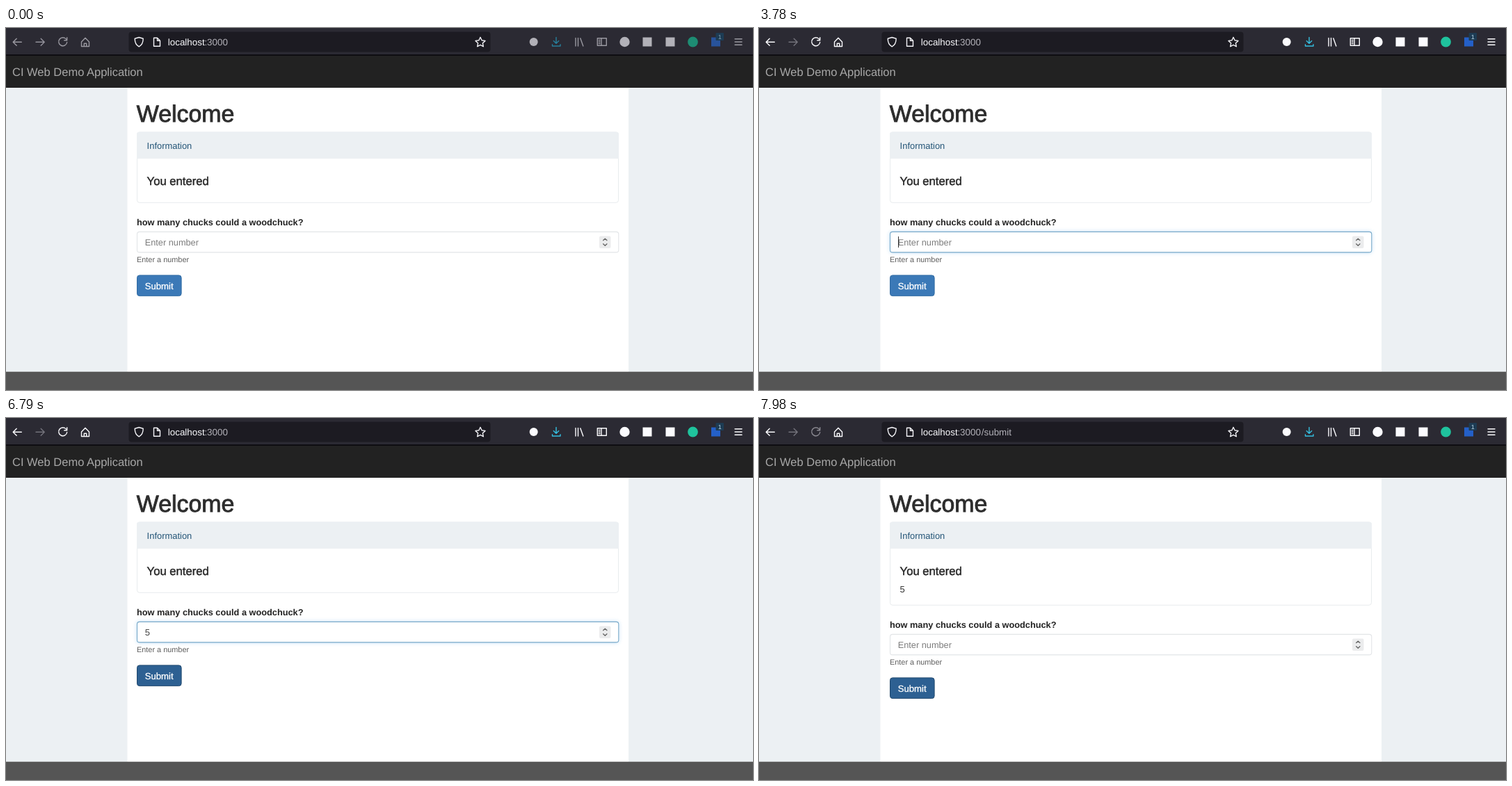
Animation, 1074 px wide and 521 px high, one loop 8000 ms. Source, as an HTML page:

```html
<!DOCTYPE html>
<html lang="en">
<head>
<meta charset="utf-8">
<title>Form demo</title>
<style>
html, body { margin: 0; width: 100%; height: 100%; overflow: hidden; background: #fff; }
svg { display: block; width: 1074px; height: 521px; }
text { font-family: "Liberation Sans", Arial, sans-serif; text-rendering: geometricPrecision; white-space: pre; }
.line { fill: none; stroke-width: 1.4; stroke-linecap: round; stroke-linejoin: round; }
#glow { filter: blur(2.5px); }
</style>
</head>
<body>
<svg viewBox="0 0 1074 521" xmlns="http://www.w3.org/2000/svg">
  <!-- page -->
  <rect width="1074" height="521" fill="#ecf0f3"/>
  <rect x="174.5" y="86" width="720.5" height="409" fill="#fff"/>
  <rect y="494.7" width="1074" height="27" fill="#555"/>
  <rect y="40" width="1074" height="46" fill="#222"/>
  <text id="brand" x="9" y="69" font-size="16.5">CI Web Demo Application</text>

  <text x="187.800" y="135" font-size="33.9" fill="#2d2d2d" stroke="#2d2d2d" stroke-width=".9">Welcome</text>
  <rect id="panel" x="188.500" y="150" width="692" height="101.300" rx="3.500" fill="#fff" stroke="#e8ecee"/>
  <path d="M188 188V153q0-3.500 3.500-3.500H877.500q3.500 0 3.500 3.500V188z" fill="#ecf0f3"/>
  <text x="202.600" y="173.600" font-size="12.95" fill="#245577">Information</text>
  <text x="202.600" y="225.600" font-size="16.65" fill="#262626" stroke="#262626" stroke-width=".45">You entered</text>
  <text id="answer" x="202.600" y="251.200" font-size="13" fill="#333">5</text>

  <g id="form">
    <text x="188" y="283.600" font-size="12.76" font-weight="700" fill="#222">how many chucks could a woodchuck?</text>
    <rect id="glow" x="187" y="292" width="695" height="32.500" rx="5" fill="#66afe9"/>
    <rect id="box" x="188.500" y="293.400" width="692.300" height="29.500" rx="3.500" fill="#fff" stroke-width="1.1"/>
    <text id="hint" x="199.700" y="312.900" font-size="12.75" fill="#7c7c7c">Enter number</text>
    <text id="digit" x="199.800" y="312.900" font-size="13" fill="#444">5</text>
    <rect id="caret" y="300" width="1" height="16" fill="#333"/>
    <rect x="853" y="299.500" width="16.500" height="17.500" rx="2" fill="#ebeced"/>
    <path class="line" d="M858.700 305.600l2.600-2.400 2.600 2.400M858.700 310.800l2.600 2.400 2.600-2.400" stroke="#666" stroke-width="1.1"/>
    <text x="188" y="337.300" font-size="10.9" fill="#5e5e5e">Enter a number</text>
    <rect id="button" x="188.500" y="355.900" width="63.600" height="29.700" rx="3.500" stroke-width="1"/>
    <text x="199.700" y="375.500" font-size="13.15" fill="#fff" stroke="#fff" stroke-width=".3">Submit</text>
  </g>

  <!-- browser toolbar -->
  <rect width="1074" height="40" fill="#2b2a33"/>
  <rect y="38" width="1074" height="2" fill="#0e0d12"/>
  <rect x="176.500" y="5.500" width="520" height="29" rx="4" fill="#1c1b22"/>
  <g class="line" stroke="#f4f4f8">
    <path d="M191.200 13.500q-4 1.300-6 1.700c0 6 2 9.500 6 11.600c4-2.100 6-5.600 6-11.600q-2-.4-6-1.700z"/>
    <path d="M212.500 14.300h5l4 4v8h-9zM217.500 14.300v4h4"/>
    <path d="M682 13.300l2.100 4.500 4.900.600-3.600 3.400.900 4.900-4.300-2.400-4.300 2.400.900-4.900-3.600-3.400 4.900-.6z"/>
  </g>
  <text y="24.800" font-size="13.4"><tspan x="232.800" fill="#fbfbfe">localhost</tspan><tspan x="285.400" fill="#b2b1b8">:3000</tspan><tspan id="path" x="319.800" fill="#b2b1b8">/submit</tspan></text>

  <path id="forward" class="line" d="M43 20.300H55M50.200 15.300l5 5-5 5"/>
  <path id="reload" class="line" d="M86.600 16.200a6 6 0 1 0 1.100 4.300M87.700 13.800v3.900h-3.900"/>
  <path id="stop" class="line" d="M77 15.500l9.600 9.600M86.600 15.500l-9.600 9.600" stroke="#fbfbfe"/>
  <g id="tools" class="line">
    <path d="M10.300 20.300H22.300M15.200 15.300l-5 5 5 5"/>
    <path d="M108.500 20l5.500-5.800 5.500 5.800v6.500h-11zM112.300 26.500v-4.300h3.400v4.300"/>
    <path d="M819 14.500v11.500M822.500 14.500v11.500M825.800 14.800l4 11.200"/>
    <path d="M850.300 14.800h13v10.500h-13zM856 14.800v10.500M852.300 17.500h1.700M852.300 20h1.700M852.300 22.500h1.700"/>
    <path d="M1048 15.700h10M1048 20h10M1048 24.300h10"/>
  </g>
  <path id="download" class="line" d="M791 13.500v8.500M787.300 18.600l3.700 3.700 3.700-3.700M785.500 23.800v2.200h11.500v-2.200"/>
  <g id="marks">
    <circle cx="758.700" cy="20" r="6"/>
    <circle cx="889.500" cy="20" r="7.200"/>
    <rect x="915.500" y="13.500" width="13" height="13"/>
    <rect x="948.500" y="13.500" width="13" height="13"/>
  </g>
  <circle id="dot" cx="987.500" cy="20" r="7.400"/>
  <rect id="square" x="1014" y="13.500" width="13" height="13"/>
  <rect x="1020.500" y="7" width="11.500" height="11" rx="1" fill="#1d3c54"/>
  <text id="count" x="1026.300" y="16" font-size="9" text-anchor="middle">1</text>
</svg>
<script>
const LOOP = 8000, STEP = 70;
const $ = id => document.getElementById(id);
const clamp = v => Math.max(0, Math.min(1, v));
const set = (id, name, value) => $(id).setAttribute(name, value);
const show = (id, on) => set(id, "visibility", on ? "visible" : "hidden");

function mix(a, b, k) {
  const part = i => {
    const p = parseInt(a.slice(i, i + 2), 16), q = parseInt(b.slice(i, i + 2), 16);
    return Math.round(p + (q - p) * k);
  };
  return `rgb(${part(1)},${part(3)},${part(5)})`;
}

function buttonColors(t) {
  if (t >= 7070 && t < 7280) return ["#244c72", "#142f49"];
  if (t >= 6580) return ["#2d6092", "#20486e"];
  return ["#3b79b7", "#316ca3"];
}

function caretX(t) {
  if (t >= 3640 && t < 4550) return 200;
  if (t >= 5040 && t < 5530 || t >= 6230 && t < 6790) return 207;
  return 0;
}

function draw(time) {
  const t = Math.floor(time / STEP) * STEP;
  const awake = clamp((t - 1540) / 140);
  const loading = t >= 7350 && t < 7770;
  const done = t >= 7630;
  const typed = t >= 5040 && !done;

  // toolbar
  const tone = mix("#9a99a1", "#fbfbfe", awake);
  set("tools", "stroke", tone);
  set("marks", "fill", mix("#b2b1b8", "#fbfbfe", awake));
  set("forward", "stroke", mix("#92919a", "#73727b", awake));
  set("reload", "stroke", t >= 7770 ? "#8b8a92" : tone);
  set("download", "stroke", mix("#277f9b", "#35bfe0", awake));
  set("dot", "fill", t >= 7490 && t < 7770 ? "#e6eeee" : mix("#1d8c73", "#1fc39d", awake));
  set("square", "fill", mix("#28539b", "#2460c8", awake));
  set("count", "fill", mix("#7f9caf", "#b8d4e4", awake));
  show("reload", !loading);
  show("stop", loading);
  show("path", t >= 7420);

  // page
  set("brand", "fill", t === 7560 ? "#ffffff" : "#a8a8a8");
  show("answer", done);
  set("panel", "height", done ? 119.3 : 101.3);
  set("form", "transform", `translate(0 ${done ? 18 : 0})`);
  show("hint", !typed);
  show("digit", typed);

  // input focus
  const focus = clamp((t - 3570) / 210);
  const edge = focus * clamp((7350 - t) / 140);
  set("glow", "opacity", 0.28 * focus * clamp((7210 - t) / 210));
  set("box", "stroke", mix("#e2e5e7", "#78a9c9", edge));
  const x = caretX(t);
  show("caret", x > 0);
  set("caret", "x", x);

  const [fill, border] = buttonColors(t);
  set("button", "fill", fill);
  set("button", "stroke", border);
}

let start;
function tick(now) {
  if (start === undefined) start = now;
  draw((now - start) % LOOP);
  requestAnimationFrame(tick);
}
draw(0);
requestAnimationFrame(tick);
</script>
</body>
</html>
```
